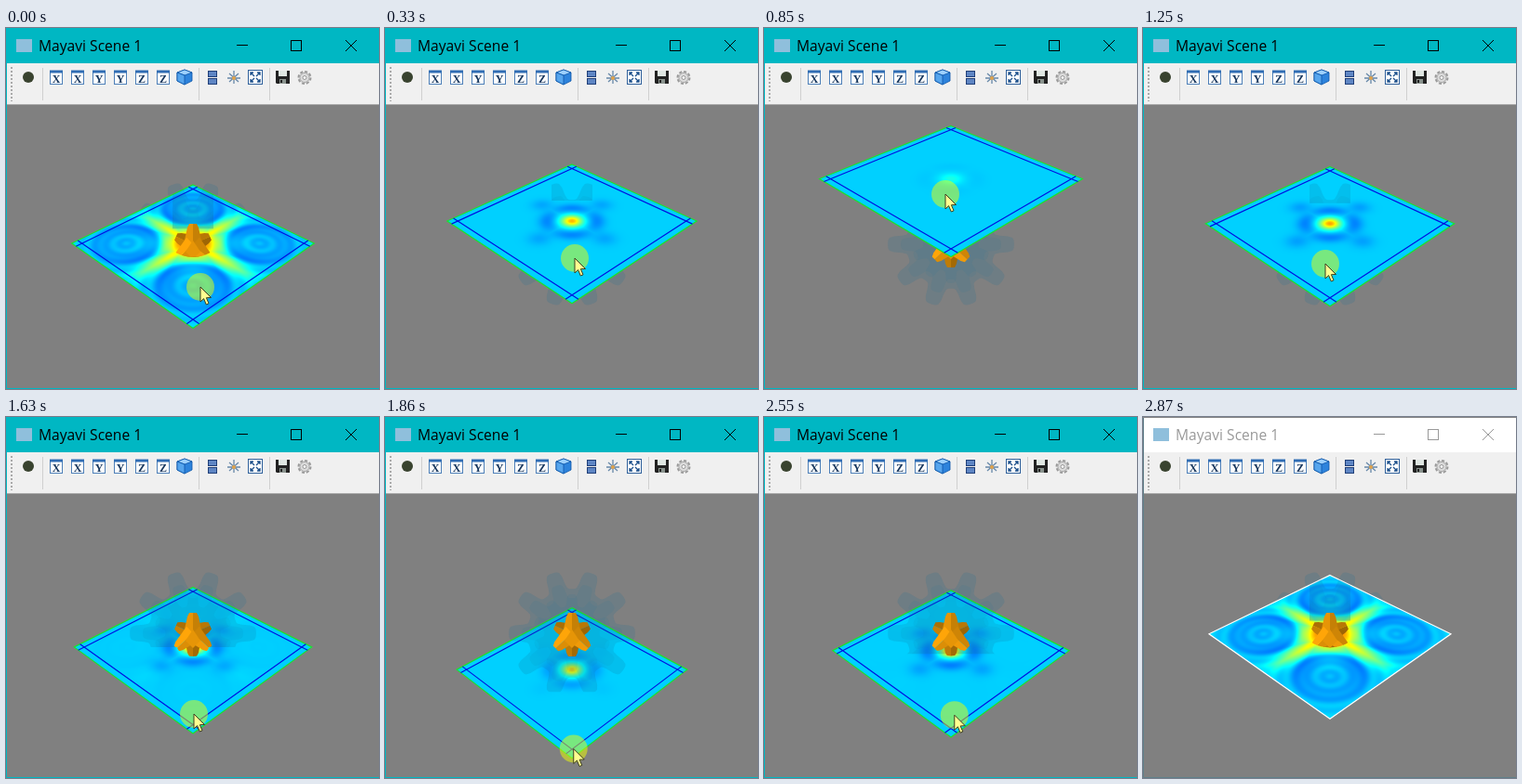
An HTML page with a canvas that plays this animation: 401 by 389 pixels, repeating every 2960 ms.

```html
<!DOCTYPE html>
<html lang="en">
<head>
<meta charset="utf-8">
<title>Cut plane through a volume</title>
<style>
html, body { margin: 0; width: 100%; height: 100%; overflow: hidden; background: #808080; }
canvas, svg { position: absolute; left: 0; top: 0; display: block; }
svg { --bar: #00b7c3; --ink: #000; --edge: #00b7c3; }
.idle svg { --bar: #fff; --ink: #999; --edge: #60808a; }
.title { font: 15.6px "Open Sans", "Noto Sans", sans-serif; fill: var(--ink); }
.letter { font: bold 12px "Liberation Serif", serif; text-anchor: middle; fill: #17375e; }
.behind { display: none; }
.idle .behind { display: inline; }
</style>
</head>
<body>
<canvas id="scene" width="401" height="389"></canvas>
<svg width="401" height="389" viewBox="0 0 401 389">
  <rect width="401" height="38" fill="var(--bar)"/>
  <path d="M.5 0V388.5H401" fill="none" stroke="var(--edge)"/>
  <path class="behind" d="M0 .5H401" stroke="#888"/>
  <rect x="11" y="12" width="17" height="14" fill="#8fbfdc"/>
  <text class="title" x="35" y="25">Mayavi Scene 1</text>
  <g fill="none" stroke="var(--ink)">
    <path d="M248 18.5H260M365 13L377 25M377 13L365 25"/>
    <rect x="306.5" y="13.5" width="11" height="11"/>
  </g>
  <rect x="1" y="38" width="400" height="45" fill="#f0f0f0"/>
  <path d="M1 82.5H401" stroke="#a8a8a8"/>
  <path d="M6 42V79" stroke="#aaa" stroke-width="2" stroke-dasharray="2 2"/>
  <path d="M39.5 43V78M207.5 43V78M283.5 43V78" stroke="#d0d0d0"/>
  <circle cx="24" cy="53" r="6" fill="#39432f"/>
  <g id="views"></g>
  <g stroke="#0b55a8" stroke-width=".8">
    <path d="M192 45L200 48V57L192 61L184 57V48Z" fill="#2d83dc"/>
    <path d="M192 45L200 48L192 51L184 48Z" fill="#9cd0ff"/>
    <path d="M192 51V61L184 57V48Z" fill="#56a5ed"/>
  </g>
  <g fill="#5f86c4" stroke="#203f78">
    <rect x="217.5" y="46.5" width="9" height="6"/>
    <rect x="217.5" y="54.5" width="9" height="6"/>
  </g>
  <path d="M245 46V60M238 54H252M240 49L250 58M250 49L240 58" stroke="#6687a8" stroke-width="1.3"/>
  <circle cx="245" cy="54" r="2" fill="#e1a34b"/>
  <rect x="260.500" y="45.500" width="15" height="15" fill="#fff" stroke="#2e5f9a"/>
  <path d="M263 51V48H266M270 48H273V51M273 55V58H270M266 58H263V55M263 48L267 52M273 48L269 52M273 58L269 54M263 58L267 54" fill="none" stroke="#1d508c" stroke-width="1.3"/>
  <path d="M290 46H305V60H291L290 59Z" fill="#222"/>
  <path d="M293 46H302V52H293Z" fill="#dfe6e2"/>
  <path d="M294 55H301V60H294Z" fill="#8a938e"/>
  <path d="M296 56V59" stroke="#222" stroke-width="2"/>
  <circle cx="321" cy="53.500" r="6.500" fill="#ddd" stroke="#999" stroke-width="2" stroke-dasharray="3 2"/>
  <circle cx="321" cy="53.500" r="5" fill="#ddd" stroke="#aaa"/>
  <circle cx="321" cy="53.500" r="2" fill="#f4f4f4" stroke="#999"/>
</svg>
<script>
const LOOP = 2960, STEP = 77.57, LAST = 37, CX = 201, CY = 233, RAD = Math.PI / 180;
const ctx = document.getElementById('scene').getContext('2d');
const sheet = document.createElement('canvas');
sheet.width = 401;
sheet.height = 389;
const sheetCtx = sheet.getContext('2d');

document.getElementById('views').innerHTML = [...'XXYYZZ'].map((c, i) => {
  const x = 54 + 23 * i;
  return `<rect x="${x - 6.5}" y="46.5" width="13" height="14" fill="#fff" stroke="#4d7fb8"/>
    <path d="M${x - 7} 47H${x + 7}" stroke="#2f6cb3" stroke-width="3"/>
    <text class="letter" x="${x}" y="59">${c}</text>`;
}).join('');

// Turning points of the drag: step, top of the plane, pointer x, pointer y
const drag = [
  [0, 169, 209, 279], [4, 147, 204, 248], [11, 105.5, 195, 179], [16, 149.5, 196, 254],
  [21, 183.5, 202, 320], [25, 213, 203, 370], [28, 200, 203, 351], [LAST, 170.5, 207, 284]
];

const clamp = (v, lo = 0, hi = 1) => Math.min(hi, Math.max(lo, v));
const bell = (x, width) => Math.exp(-((x / width) ** 2));

function poseAt(i) {
  const k = Math.max(1, drag.findIndex(p => p[0] >= i));
  const from = drag[k - 1], to = drag[k];
  const f = (i - from[0]) / (to[0] - from[0]);
  return from.map((v, j) => v + (to[j] - v) * f).slice(1);
}

// Perspective of the plane; p runs right and q down along its diagonals
function makePlane(top) {
  const rise = top - 105;
  const mid = top + 57 + 0.095 * rise;
  const bottom = top + 141 + 0.21 * rise;
  const w = 141.5 - 0.175 * rise;
  const g = (bottom + top - 2 * mid) / (bottom - top);
  const h = (bottom - mid) * (1 - g);
  const toScreen = (a, b) => {
    const p = (a - b) / 2, q = (a + b) / 2, s = 1 - g * q;
    return [CX + w * p / s, mid + h * q / s];
  };
  const toPlane = (x, y) => {
    const q = (y - mid) / (h + g * (y - mid));
    return [(x - CX) * (1 - g * q) / w, q];
  };
  const corners = [[-1, -1], [1, -1], [1, 1], [-1, 1]].map(c => toScreen(...c));
  return { top, mid, bottom, w, toScreen, toPlane, corners };
}

function field(a, b, top) {
  const A = Math.abs(a), B = Math.abs(b), r = Math.hypot(a, b);
  const far = Math.max(A, B), near = Math.min(A, B);
  const d = Math.hypot(A - 0.55, B - 0.55);
  const middle = bell(top - 170, 8);
  const arms = 0.3 * bell(near, 0.12) * Math.exp(-((far / 0.8) ** 4));
  const cross = Math.max(arms, 0.48 * bell(r, 0.35))
    - 0.15 * bell(d - 0.33, 0.1) * (0.15 + 0.85 * bell(r, 0.75))
    - 0.03 * bell(d, 0.35) + 0.012 * Math.cos(d * 42);
  const diagonal = 2 * A * B / (r * r + 1e-6);
  const spot = 0.5 * bell(top - 175, 50) * bell(r, 0.12)
    - 0.1 * bell(top - 170, 40) * (0.3 + 0.7 * diagonal) * bell(r - 0.28, 0.1)
    - 0.08 * bell(top - 168, 25) * bell(Math.hypot(far - 0.5, near), 0.13);
  return Math.min(0.72, 0.329 + middle * cross + (1 - middle) * spot);
}

const jet = v => [3, 2, 1].map(c => 255 * clamp(1.5 - Math.abs(4 * v - c)));

function trace(points) {
  points.forEach((p, i) => i ? ctx.lineTo(...p) : ctx.moveTo(...p));
  ctx.closePath();
}

function polygon(points, fill, stroke, width) {
  ctx.beginPath();
  trace(points);
  if (fill) { ctx.fillStyle = fill; ctx.fill(); }
  if (stroke) { ctx.strokeStyle = stroke; ctx.lineWidth = width; ctx.stroke(); }
}

function drawPlane(plane, idle) {
  const x0 = Math.floor(CX - plane.w), y0 = Math.floor(plane.top);
  const cols = Math.ceil(2 * plane.w) + 2, rows = Math.ceil(plane.bottom - plane.top) + 2;
  const img = sheetCtx.createImageData(cols, rows);
  for (let y = 0, n = 0; y < rows; y++) {
    for (let x = 0; x < cols; x++, n += 4) {
      const [p, q] = plane.toPlane(x0 + x + 0.5, y0 + y + 0.5);
      if (Math.abs(p) + Math.abs(q) > 1) continue;
      img.data.set(jet(field(q + p, q - p, plane.top)), n);
      img.data[n + 3] = 255;
    }
  }
  sheetCtx.clearRect(0, 0, 401, 389);
  sheetCtx.putImageData(img, x0, y0);
  ctx.drawImage(sheet, 0, 0);

  polygon(plane.corners, null, idle ? '#fff' : '#1be32a', 1.2);
  if (idle) return;
  ctx.strokeStyle = '#0010e0';
  ctx.beginPath();
  for (const k of [-0.915, 0.915]) {
    ctx.moveTo(...plane.toScreen(k, -1));
    ctx.lineTo(...plane.toScreen(k, 1));
    ctx.moveTo(...plane.toScreen(-1, k));
    ctx.lineTo(...plane.toScreen(1, k));
  }
  ctx.stroke();
}

// Outer surface: rings of ten blunt teeth
function gearRing(size, turn, alpha) {
  const points = Array.from({ length: 180 }, (_, i) => {
    const t = i * 2 * RAD;
    const r = size * (0.85 + 0.15 * Math.tanh(2.5 * Math.cos(10 * t - turn)));
    return [CX + r * Math.sin(t), CY - r * Math.cos(t)];
  });
  polygon(points, `rgba(20,110,150,${alpha})`);
}

function drawGear() {
  gearRing(68, Math.PI, 0.17);
  gearRing(54, Math.PI, 0.08);
  gearRing(42, 0, 0.08);
}

// Inner surface: blunt cones, lit from the left, back ones first
const cones = [[180, 25, 0.75], [66, 20, 0.72], [-66, 20, 0.78], [0, 22, 0.9], [133, 24, 0.94], [-133, 24, 1]];

function drawStar() {
  const orange = k => `rgb(${255 * k},${165 * k},${8 * k})`;
  for (const [angle, length, light] of cones) {
    ctx.save();
    ctx.translate(CX, CY);
    ctx.rotate(angle * RAD);
    for (const side of [-1, 1]) {
      const lit = side * Math.cos(angle * RAD) < 0 ? 1 : 0.86;
      polygon([[0, 0], [10 * side, 0], [6 * side, 4 - length], [4 * side, -length], [0, -length]], orange(light * lit));
    }
    ctx.restore();
  }
  polygon([[CX, CY - 4], [CX + 8, CY + 8], [CX, CY + 16], [CX - 8, CY + 8]], orange(0.9));
}

function clipped(shape, draw) {
  ctx.save();
  ctx.beginPath();
  shape();
  ctx.clip();
  draw();
  ctx.restore();
}

// Parts on the near side of the plane
function drawAbove(plane) {
  const { mid, corners } = plane;
  const half = clamp(22 + (mid - 236) * 6, 22, 75);
  const floor = mid + Math.max(-22, mid - 248);
  clipped(() => trace(corners), () =>
    clipped(() => ctx.rect(CX - half, 83, 2 * half, floor - 83), drawGear));

  const lift = (CY - mid) / 0.81;
  if (lift > 25) return;
  const r = Math.sqrt(Math.max(0, 625 - lift * lift));
  clipped(() => {
    ctx.rect(CX - 40, 83, 80, mid - 83);
    ctx.ellipse(CX, mid, r, r * 0.59, 0, 0, Math.PI);
  }, drawStar);
}

const arrow = [[0, 0], [0, 16], [3.6, 12.6], [6.3, 19], [9, 17.8], [6.4, 11.7], [11.5, 11.5]];

function drawPointer(x, y) {
  ctx.fillStyle = 'rgba(240,255,0,.5)';
  ctx.beginPath();
  ctx.arc(x, y, 15, 0, 2 * Math.PI);
  ctx.fill();
  polygon(arrow.map(p => [x + p[0], y + p[1]]), '#ffff90', '#3c3c20', 1);
}

function draw(i) {
  const [top, x, y] = poseAt(i);
  const plane = makePlane(top), idle = i >= LAST - 1;
  document.body.className = idle ? 'idle' : '';
  ctx.fillStyle = '#808080';
  ctx.fillRect(0, 0, 401, 389);
  drawGear();
  drawStar();
  drawPlane(plane, idle);
  drawAbove(plane);
  if (!idle) drawPointer(x, y);
}

let shown = -1;
function tick() {
  const t = performance.now() % LOOP;
  const i = Math.min(LAST, Math.floor(t / STEP + 0.05));
  if (i !== shown) draw(shown = i);
  requestAnimationFrame(tick);
}
tick();
</script>
</body>
</html>
```
